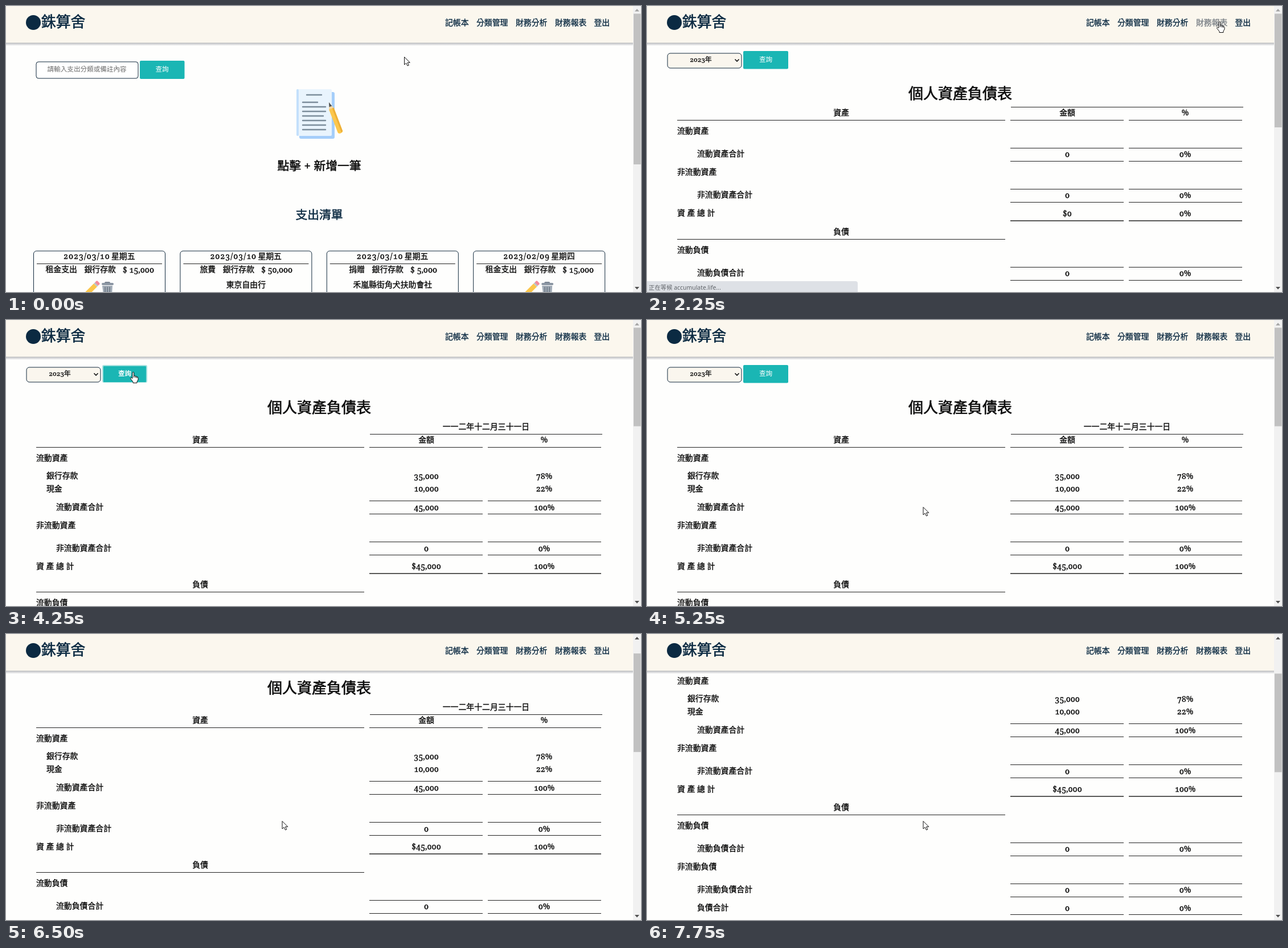
Write an HTML page that moves like this. It is 1115x502 px and loops after 8 s.

```html
<!DOCTYPE html>
<html lang="zh-Hant">
<head>
<meta charset="utf-8">
<title>記帳</title>
<style>
  html, body { margin: 0; width: 100%; height: 100%; overflow: hidden; background: #fefefd; }
  svg { display: block; width: 100%; height: 100%; }
  /* The thin stroke gives a medium weight */
  text {
    --ink: #0a0a0a;
    font: 500 13.87px 'Noto Serif', 'Noto Sans CJK TC', 'Noto Sans CJK JP', 'Noto Sans CJK', sans-serif;
    font-variant-numeric: oldstyle-nums;
    fill: var(--ink);
    stroke: var(--ink);
    stroke-width: .025em;
  }
  .mid { text-anchor: middle; }
  text.navy { --ink: #0b2a42; }
  text.hover { --ink: #7b8187; }
  text.white { --ink: #fff; font-weight: 400; stroke: none; }
  text.hint { --ink: #6c6c6c; font-weight: 400; stroke: none; }
  text.date { letter-spacing: .95px; }
  text.status {
    --ink: #5f6368;
    font-family: 'Noto Sans', 'Noto Sans CJK TC', 'Noto Sans CJK', sans-serif;
    font-weight: 400;
    stroke: none;
  }
  .active text.white { font-weight: 700; }
  .rule { stroke: #222; stroke-width: 1; }
  .box { fill: none; stroke: #10283c; stroke-width: 1; }
  .cursor { fill: #fff; stroke: #111; stroke-width: 1; stroke-linejoin: round; }
</style>
</head>
<body>
<svg id="stage" viewBox="0 0 1115 502" preserveAspectRatio="none"></svg>
<script>
const LOOP = 8000;
const TEAL = '#1ab6b4', NAVY = '#0b2a42';

// y is the vertical centre of the line of text; baselines sit on whole pixels
const text = (x, y, s, cls = '', size = 13.87) =>
  `<text x="${x}" y="${Math.round(y + size * .36 - .7)}" class="${cls}" style="font-size:${size}px">${s}</text>`;
const rect = (x, y, w, h, fill, r = 0, extra = '') =>
  `<rect x="${x}" y="${y}" width="${w}" height="${h}" rx="${r}" fill="${fill}" ${extra}/>`;
const box = (x, y, w, h, r = 5, style = '') =>
  `<rect x="${x + .5}" y="${y + .5}" width="${w}" height="${h}" rx="${r}" class="box" style="${style}"/>`;
const path = (d, fill, extra = '') => `<path d="${d}" fill="${fill}" ${extra}/>`;
const rule = (x1, x2, y) => `<path class="rule" d="M${x1} ${Math.round(y) - .5}H${x2}"/>`;
const group = (id, content, extra = '') => `<g id="${id}" ${extra}>${content}</g>`;
const shift = (x, y, content) => `<g transform="translate(${x} ${y})">${content}</g>`;

function notebook() {
  const lines = [[527, 555, 156], [520, 548, 169]];
  for (let i = 0; i < 6; i++) lines.push([520, i === 2 ? 558 : 562, 177 + i * 8]);
  return rect(515, 151, 62, 82, '#a5cefa', 3) +
    rect(510, 146, 62, 82, '#e9f4fd', 2) +
    rect(510, 146, 4, 82, '#c4e0fb', 2) +
    lines.map(([a, b, y]) =>
      `<path d="M${a + 1} ${y}H${b - 1}" stroke="#7b8d9b" stroke-width="2.4" stroke-linecap="round"/>`).join('') +
    `<g transform="translate(567 169) rotate(-21)">` +
    path('M0 0L-4.5 13H4.5Z', '#f5d5a0') + path('M0 0L-2.5 8H2.5Z', '#4a5158') +
    path('M-4.5 12H4.5V55Q4.5 58 0 58T-4.5 55Z', '#fcc74d') + path('M1.5 12H4.5V56L1.5 57Z', '#eeb038') + '</g>';
}

const cardIcons = () =>
  '<g transform="translate(159 488) rotate(45)">' +
  rect(-4, -5, 8, 6, '#f48a9b', 2) + rect(-4, 0, 8, 3, '#b9c4cb') + rect(-4, 3, 8, 28, '#fbc64c') + '</g>' +
  rect(173, 484, 10, 4, '#7c8794', 2) + rect(168, 486, 21, 4, '#8a95a2', 2) +
  path('M169 491H187L186 506H171Z', '#a1abb6') +
  path('M174 493V506M178 493V506M182 493V506', 'none', 'stroke="#6e7986" stroke-width="1.6"');

function card(x, [date, day, kind, kindX, price, note]) {
  const priceX = kindX + kind.length * 13.87 + 80;
  return shift(x, 0,
    box(0, 429.5, 231, 120) + text(53, 440, date, 'date') + text(137, 440, day) +
    rule(6, 226, 453) + text(kindX, 463, kind) + text(priceX - 67.5, 463, '銀行存款') +
    text(priceX, 463.5, price) + (note ? text(116, 490, note, 'mid') : shift(-48, 0, cardIcons())));
}

function homePage() {
  const cards = [
    ['2023/03/10', '星期五', '租金支出', 21.5, '$ 15,000'],
    ['2023/03/10', '星期五', '旅費', 35, '$ 50,000', '東京自由行'],
    ['2023/03/10', '星期五', '捐贈', 39.5, '$ 5,000', '禾嵐縣街角犬扶助會社'],
    ['2023/02/09', '星期四', '租金支出', 21.5, '$ 15,000']
  ];
  return box(52.5, 97.5, 179, 29, 4, 'fill:#fff') + text(72.5, 112, '請輸入支出分類或備註內容', 'hint', 11.6) +
    rect(235, 96, 78.5, 32, TEAL, 2) + text(274, 112, '查詢', 'white mid', 11.6) +
    notebook() +
    text(550, 281, '點擊 + 新增一筆', 'mid', 20.8) + text(550, 367, '支出清單', 'mid navy', 20.8) +
    cards.map((c, i) => card(48 + i * 257.4, c)).join('');
}

const amounts = (y, amount, percent) => text(738, y, amount, 'mid') + text(945, y, percent, 'mid');
const columnRules = y => rule(638, 837, y) + rule(846, 1045, y);

function balanceSheet(loaded) {
  const sum = loaded ? ['45,000', '100%'] : ['0', '0%'];
  let y = loaded ? 211 : 188;
  let out = text(550, 154, '個人資產負債表', 'mid', 26);
  if (loaded) out += text(843, 187.5, '一一二年十二月三十一日', 'mid');

  const heading = name => { out += text(341, y, name, 'mid') + rule(53, 629, y + 13); };
  const section = (name, items, total) => {
    y += 32;
    out += text(53, y, name);
    items.forEach(([item, ...values], i) => {
      const rowY = y + 31 + i * 22.7;
      out += text(71, rowY, item) + amounts(rowY + .5, ...values);
    });
    y += 40 + items.length * 22.7;
    out += text(88, y, name + '合計') + amounts(y + 1, ...total) + columnRules(y - 10) + columnRules(y + 13);
  };

  heading('資產');
  out += rule(639, 1047, y - 10) + columnRules(y + 13) + amounts(y, '金額', '%');
  section('流動資產', loaded ? [['銀行存款', '35,000', '78%'], ['現金', '10,000', '22%']] : [], sum);
  section('非流動資產', [], ['0', '0%']);
  y += 32;
  out += text(53, y, '資 產 總 計') + amounts(y + .5, '$' + sum[0], sum[1]) +
    `<g opacity=".75">${columnRules(y + 13)}${columnRules(y + 14)}</g>`;
  y += 32.5;
  heading('負債');
  section('流動負債', [], ['0', '0%']);
  section('非流動負債', [], ['0', '0%']);
  y += 32;
  out += text(88, y, '負債合計') + amounts(y + .5, '0', '0%') + columnRules(y + 12.5);
  return out;
}

const yearFilter = () =>
  box(35.5, 82.5, 130, 26, 5, 'fill:#faf6ee') + text(94.5, 95, '2023年', 'mid', 11.6) +
  path('M154.500 93.500L158 97L161.500 93.500', 'none', 'stroke="#111" stroke-width="1.6"') +
  group('idle', rect(169, 79, 79, 31.5, TEAL, 2) + text(208.5, 95, '查詢', 'white mid', 11.6)) +
  group('active', rect(169, 79, 79, 31, '#a3e0de', 3) + rect(171, 81, 75, 28, TEAL, 1) +
    text(208.5, 95, '查詢', 'white mid', 11.6), 'class="active"');

const header = () =>
  rect(0, 64, 1101, 6, 'url(#shade)') + rect(0, 0, 1101, 64.5, '#fbf7ee') +
  `<circle cx="48" cy="29" r="13" fill="${NAVY}"/>` + text(62, 28.5, '銖算舍', 'navy', 25.8) +
  [[771, '記帳本'], [826, '分類管理'], [895, '財務分析'], [964, '財務報表'], [1032.5, '登出']]
    .map(([x, s]) => text(x, 30, s, 'navy')).join('');

const scrollbar = () =>
  rect(1101, 0, 14, 502, '#f1f1f1') + '<rect id="thumb" x="1102" width="12.500" fill="#c1c1c1"/>' +
  '<path id="up" d="M1104 9.500L1108 5L1112 9.500Z"/>' + path('M1104 493L1108 497.500L1112 493Z', '#505050');

const stage = document.getElementById('stage');
stage.innerHTML =
  '<defs><linearGradient id="shade" x2="0" y2="1"><stop stop-color="#70747c" stop-opacity=".55"/>' +
  '<stop offset="1" stop-color="#70747c" stop-opacity="0"/></linearGradient></defs>' +
  rect(0, 0, 1115, 502, '#fefefd') +
  group('home', homePage()) +
  group('report', group('empty', balanceSheet(false)) + group('filled', balanceSheet(true)) + yearFilter()) +
  header() + scrollbar() +
  group('status', '<rect id="bar" x="-5" y="483" height="30" rx="4" fill="#dee1e6"/>' +
    text(3, 494.5, '', 'status', 10.4)) +
  path('M.5.5V14L3.700 11.200L6 16L8.300 15L6 10.300H10.300Z', '', 'id="arrow" class="cursor"') +
  path('M4 11V2Q4 .5 5.300.5T6.700 2V7Q9 6 9.300 8Q11.500 7 11.700 9Q14 8.500 14 10.500V14L12 17V19.500H5V17.500L1 12.500Q0 10.500 1.500 10.200T4 12M6.700 7V10M9.300 8V10.500M11.700 9V11',
    '', 'id="hand" class="cursor"');

const $ = id => document.getElementById(id);
const navReport = [...stage.querySelectorAll('text')].find(el => el.textContent === '財務報表');
const statusText = stage.querySelector('text.status');

// Each entry holds from its time until the next one.
const cursorSteps = [
  [0, 'arrow', 699, 89], [250, 'arrow', 721, 107], [500, 'arrow', 847, 103], [750, 'arrow', 927, 76],
  [1000, 'arrow', 972, 56], [1250, 'hand', 1000, 27], [2750, 'arrow', 690, 108], [3000, 'arrow', 685, 119],
  [3250, 'arrow', 270, 142], [3500, 'arrow', 242, 114], [3750, 'hand', 218, 91], [4750, 'hand', 221, 91],
  [5000, 'arrow', 360, 206], [5250, 'arrow', 484.5, 328]
];
const scrollSteps = [[0, 0], [6000, 24], [6250, 46], [6500, 59], [7250, 96], [7500, 141], [7750, 160]];
const waiting = '正在等候 accumulate.life...';
const statusSteps = [
  [0, 0, '', 0], [1500, 215, 'https://accumulate.life/balanceSheet', 1], [1750, 370, waiting, 1],
  [2750, 158, waiting, 1], [3000, 158, waiting, .5], [3250, 0, '', 0]
];
const thumbSteps = [[0, 264.5], [2250, 199.5], [4250, 173]];

const at = (steps, t) => steps.findLast(s => s[0] <= t).slice(1);
const show = (id, on) => $(id).setAttribute('visibility', on ? 'inherit' : 'hidden');

function draw(t) {
  const [scroll] = at(scrollSteps, t);
  const pressed = t >= 3750 && t < 5000;
  show('home', t < 2250);
  show('report', t >= 2250);
  show('empty', t < 4250);
  show('filled', t >= 4250);
  show('idle', !pressed);
  show('active', pressed);
  $('report').setAttribute('transform', `translate(0 ${-scroll})`);
  navReport.setAttribute('class', t >= 1250 && t < 2750 ? 'hover' : 'navy');

  $('thumb').setAttribute('y', 13.5 + scroll * .35);
  $('thumb').setAttribute('height', at(thumbSteps, t)[0]);
  $('up').setAttribute('fill', scroll ? '#505050' : '#a3a3a3');

  const [width, label, opacity] = at(statusSteps, t);
  $('status').setAttribute('opacity', opacity);
  $('bar').setAttribute('width', width + 5);
  statusText.textContent = label;

  const [kind, x, y] = at(cursorSteps, t);
  for (const id of ['arrow', 'hand']) show(id, id === kind);
  $(kind).setAttribute('transform', `translate(${x} ${y})`);
}

const start = performance.now();
function tick() {
  draw((performance.now() - start) % LOOP);
  requestAnimationFrame(tick);
}
tick();
</script>
</body>
</html>
```
